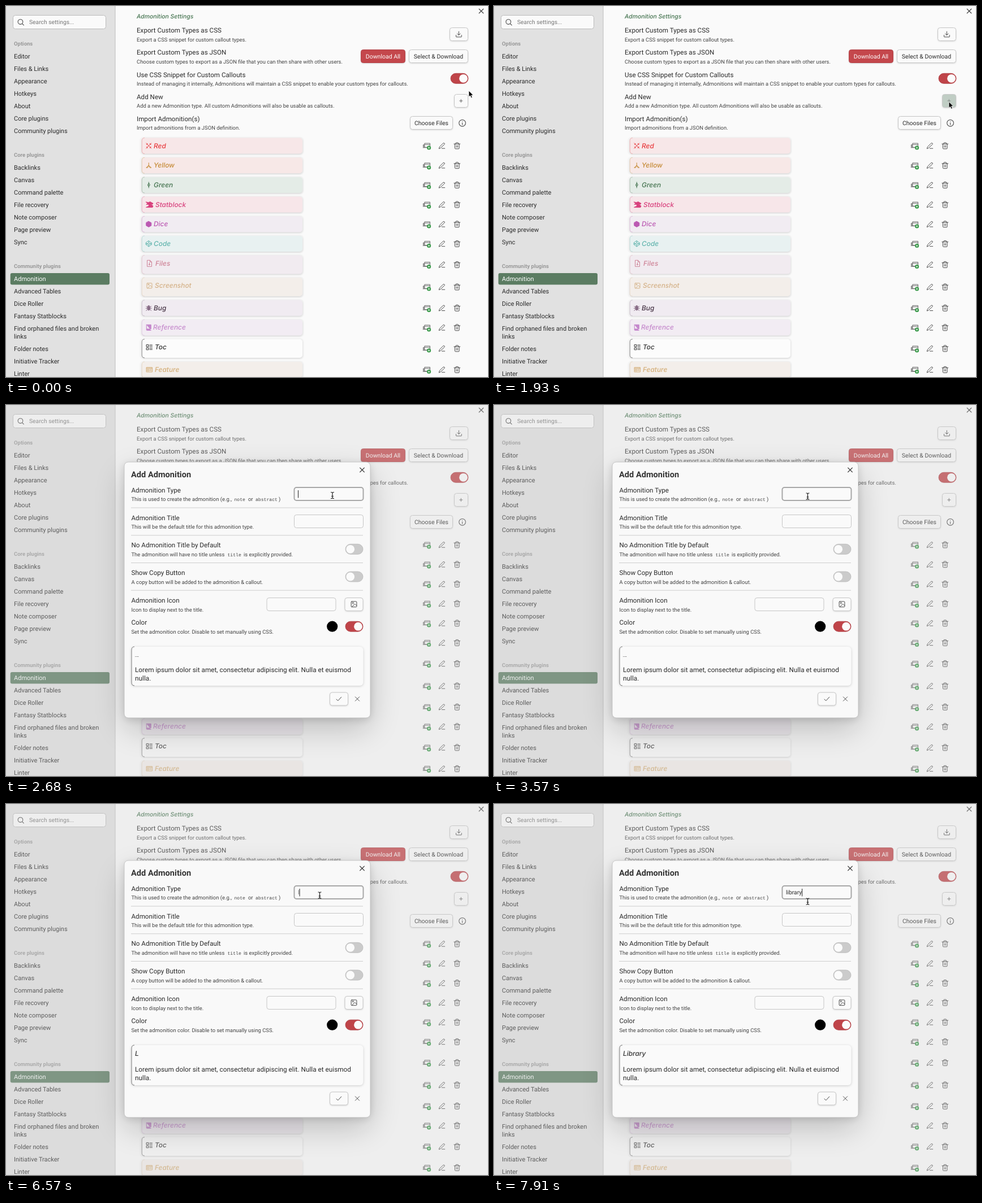
These frames come from a looping animation (852x657 px, 8000 ms). An HTML page:

```html
<!DOCTYPE html>
<html lang="en">
<head>
<meta charset="utf-8">
<title>Admonition settings</title>
<style>
html, body { margin: 0; width: 100%; height: 100%; overflow: hidden; background: #fafafa; }
svg { display: block; }
text { font-family: Roboto, "Open Sans", sans-serif; fill: #2b2b2b; white-space: pre; text-rendering: geometricPrecision; }
.nav { font-size: 11px; }
.group { font-size: 9.5px; font-weight: 600; fill: #999; }
.search { font-size: 10.3px; fill: #777; }
.name { font-size: 11.65px; }
.desc { font-size: 9.43px; fill: #444; }
.btn { font-size: 10.5px; text-anchor: middle; }
.code { font: 8.1px "Liberation Mono", monospace; fill: #444; }
.head { font-size: 14.6px; font-weight: 700; fill: #333; }
.lorem { font-size: 11.8px; }
.typed { font-size: 10.3px; }
.hand { font: italic 500 11.9px Inter, sans-serif; }
.light { fill: #fff; }
.line { fill: none; stroke: #444; stroke-linecap: round; stroke-linejoin: round; }
.box { fill: #fafafa; stroke: #c6c6c6; }
.raised { filter: drop-shadow(0 1px 1px rgba(0,0,0,.13)); }
.callout { filter: drop-shadow(0 1px 1.5px rgba(0,0,0,.14)); }
</style>
</head>
<body>
<svg id="stage" xmlns="http://www.w3.org/2000/svg" width="852" height="657" viewBox="0 0 852 657"></svg>
<script>
const rect = (x, y, w, h, r, attrs = '') =>
  `<rect x="${x}" y="${y}" width="${w}" height="${h}" rx="${r}" ${attrs}/>`;
const text = (cls, x, base, str, attrs = '') =>
  `<text class="${cls}" x="${x}" y="${base}" ${attrs}>${str.replace(/&/g, '&amp;')}</text>`;
// Icons are drawn on a 24-unit grid around their centre.
const icon = (cx, cy, size, d, attrs = '', width = 1.8) =>
  `<path class="line" transform="translate(${cx - size / 2} ${cy - size / 2}) scale(${size / 24})" stroke-width="${width}" d="${d}" ${attrs}/>`;
const tint = (color, fill = 'none') => `style="stroke:${color};fill:${fill}"`;
const button = (x, y, w, h, label = '', attrs = '') =>
  rect(x + .5, y + .5, w - 1, h - 1, 4, `class="box raised" ${attrs}`) +
  (label && text('btn', x + w / 2, y + h / 2 + 3.9, label));
const field = (x, y, w, h, attrs = '') => rect(x + .5, y + .5, w - 1, h - 1, 4, `class="box" ${attrs}`);
const toggle = (x, cy, on) =>
  rect(x, cy - 9, 31, 18, 9, on ? 'fill="#bf4449" stroke="#ab3d42" stroke-width=".8"' : 'fill="#cbcbcb" stroke="#b8b8b8" stroke-width=".8"') +
  `<circle cx="${x + (on ? 22.5 : 8.7)}" cy="${cy}" r="7.4" fill="#fbfbfb"/>`;
const setting = (x, y, name, desc) =>
  text('name', x, y + 4.2, name) + (desc ? text('desc', x, y + 19.6, desc) : '');

const CROSS = 'M5 5L19 19M19 5L5 19';
const PICTURE = 'M5 3H19Q21 3 21 5V19Q21 21 19 21H5Q3 21 3 19V5Q3 3 5 3ZM7 8a2 2 0 1 0 4 0a2 2 0 1 0-4 0M5 21L15 11L21 17';
const TRASH = 'M2 6H22M5 6V20Q5 22 7 22H17Q19 22 19 20V6M8 6V3Q8 2 9 2H15Q16 2 16 3V6M10 11V17M14 11V17';
const PENCIL = 'M12 21H22M17 3Q19 2 21 4Q22 6 20 8L7 20L2 22L4 16Z';
const DOWNLOAD = 'M3 15V20Q3 21 4 21H20Q21 21 21 20V15M7 10L12 15L17 10M12 15V3';
const CHECK = 'M4 13L9 18L20 6';

function sidebar() {
  const groups = [
    ['Options', 66.5, ['Editor', 'Files & Links', 'Appearance', 'Hotkeys', 'About', 'Core plugins', 'Community plugins']],
    ['Core plugins', 264, ['Backlinks', 'Canvas', 'Command palette', 'File recovery', 'Note composer', 'Page preview', 'Sync']],
    ['Community plugins', 461, ['Admonition', 'Advanced Tables', 'Dice Roller', 'Fantasy Statblocks',
      'Find orphaned files and broken', 'links', 'Folder notes', 'Initiative Tracker', 'Linter']],
  ];
  let out = rect(0, 0, 193, 657, 0, 'fill="#e1e1e1"') + rect(192.5, 0, 1, 657, 0, 'fill="#bdbdbd"') +
    rect(7.7, 473, 175.3, 20.4, 3, 'fill="#5b7c62"') +
    rect(12.5, 16.5, 164, 24, 4, 'id="search" fill="#fafafa" stroke="#bcbcbc"') +
    icon(26, 28.6, 13, 'M3 11a8 8 0 1 0 16 0a8 8 0 1 0-16 0M17 17L22 22', '', 2) +
    text('search', 41, 32.3, 'Search settings...') +
    rect(41, 22, 1, 13, 0, 'id="searchCaret" fill="#222"');
  for (const [title, y, items] of groups) {
    out += text('group', 14, y + 3.4, title);
    let cy = y + 22.3;
    for (const item of items) {
      if (item === 'links') cy -= 8;
      out += text(item === 'Admonition' ? 'nav light' : 'nav', 14, cy + 4, item);
      cy += 22;
    }
  }
  return out;
}

// name, centre, box height, text colour, fill, text x, icon path, solid icon
const callouts = [
  ['Red', 247.5, 28, '#e8393c', '#f7e7e8', 261, 'M3 3L21 21M21 3L3 21M4 8Q8 8 8 4M20 8Q16 8 16 4M4 16Q8 16 8 20M20 16Q16 16 16 20'],
  ['Yellow', 282.3, 28, '#c58a35', '#f7e8e7', 261, 'M12 3V12L3 20H8L12 12L16 20H21L12 12'],
  ['Green', 317, 28, '#44734f', '#e4ece7', 261, 'M12 2V22M12 6L8 12L12 18L16 12Z'],
  ['Statblock', 351.6, 28, '#d8417d', '#f7e6e9', 264, 'M0 3L9 5L14 2L25 8L23 11L16 11L25 17L23 22H0L11 17L8 11L1 12L5 8Z', true],
  ['Dice', 386.4, 28, '#bb58b2', '#f1ecf2', 261, 'M12 2L21 7V17L12 22L3 17V7Z', true],
  ['Code', 421, 28, '#62b5ae', '#e8f1f1', 261, 'M12 2L22 9V15L12 22L2 15V9ZM12 2V9M2 9L12 16L22 9M2 15L12 9L22 15M12 16V22'],
  ['Files', 458, 33, '#ce8296', '#f1ebf0', 264, 'M5 1H14L20 7V23H5ZM14 1V7H20M12 10V18M9 15L12 18L15 15'],
  ['Screenshot', 497.5, 33, '#d4b187', '#f3eeea', 263, PICTURE],
  ['Bug', 534.8, 28, '#463445', '#f0ebf1', 261, 'M8 8H16V17Q12 24 8 17ZM8 6Q12 0 16 6ZM2 13H22M3 6L8 10M21 6L16 10M3 21L8 17M21 21L16 17', true],
  ['Reference', 569.4, 28, '#c588cc', '#f2ecf3', 260, 'M4 2H20V17H6M4 2V20Q4 22 6 22H20M6 17Q4 17 4 20', true],
  ['Toc', 606.5, 33, '#333', '#fcfcfc', 263, 'M2 3H9V10H2ZM2 14H9V21H2ZM13 4H22M13 9H22M13 15H22M13 20H22'],
  ['Feature', 644, 28, '#d4ae78', '#f3eeea', 263, 'M2 4H22V20H2ZM2 7H22M5 11H10V16H5ZM13 11H19M13 15H19'],
];

function calloutRow([name, cy, h, color, fill, x, path, solid]) {
  const ty = h > 30 ? cy - 2.2 : cy;
  const tone = name === 'Bug' ? '#876b85' : color;
  const top = cy - h / 2;
  return rect(236, top - 2, 291, h + 5, 7, 'fill="#000" opacity=".02"') +
    rect(240, top, 284, h, 5, `fill="${fill}" class="callout"`) +
    `<path d="M245 ${top}Q240.3 ${top} 240.3 ${top + 5}V${top + h - 5}Q240.3 ${top + h} 245 ${top + h}" fill="none" stroke="${tone}" stroke-width=".6" opacity="${name === 'Toc' ? .9 : .5}"/>` +
    icon(x > 261 ? 253.5 : 252.3, ty, 12, path, tint(tone, solid ? tone : 'none'), 2) +
    text('hand', x, ty + 4, name, `style="fill:${color}"`) +
    icon(743.5, cy, 13, 'M6 4H23V17H6ZM6 8H23M3 8V18M0 10H3M0 14H3M0 18H14', tint('#666')) +
    `<circle cx="747.6" cy="${cy + 3.6}" r="3.5" fill="#2f9440"/>` +
    icon(747.6, cy + 3.6, 5, 'M12 4V20M4 12H20', tint('#fff'), 4) +
    icon(770.5, cy, 12.5, PENCIL) + icon(797.3, cy, 13, TRASH);
}

function page() {
  return rect(0, 0, 852, 657, 0, 'fill="#fafafa"') + sidebar() +
    text('hand', 231, 22, 'Admonition Settings', 'style="fill:#44734f;font-size:10.4px"') +
    setting(231, 43, 'Export Custom Types as CSS', 'Export a CSS snippet for custom callout types.') +
    setting(231, 82, 'Export Custom Types as JSON', 'Choose custom types to export as a JSON file that you can then share with other users.') +
    setting(231, 121.4, 'Use CSS Snippet for Custom Callouts',
      'Instead of managing it internally, Admonitions will maintain a CSS snippet to enable your custom types for callouts.') +
    setting(231, 160.6, 'Add New', 'Add a new Admonition type. All custom Admonitions will also be usable as callouts.') +
    setting(231, 199.6, 'Import Admonition(s)', 'Import admonitions from a JSON definition.') +
    button(784, 38, 33, 24) + icon(800.4, 50, 13, DOWNLOAD) +
    rect(627.5, 77.5, 78, 23, 4, 'fill="#c4474c" stroke="#b34348" class="raised"') + text('btn light', 666.5, 92.8, 'Download All') +
    button(712, 77, 105, 24, 'Select & Download') +
    toggle(786, 128.3, true) +
    button(792, 156, 25, 24, '', 'id="add"') + icon(804.3, 168, 8, 'M12 4V20M4 12H20', 'id="plus"', 2.4) +
    button(714, 195, 76, 24, 'Choose Files') +
    icon(806.6, 207.3, 14, 'M2 12a10 10 0 1 0 20 0a10 10 0 1 0-20 0M12 11V17M12 7V7.2') +
    icon(840, 9, 13, CROSS, '', 2.2) +
    callouts.map(calloutRow).join('');
}

function modal() {
  const divider = y => rect(221, y, 410, 1, 0, 'fill="#cdcdcd"');
  return rect(0, 0, 852, 657, 0, 'fill="#d2d2d2" opacity=".3"') +
    rect(209, 121, 435, 453, 20, 'filter="url(#wide)" opacity=".2"') +
    rect(209, 104, 435, 453, 8, 'filter="url(#near)" opacity=".13"') +
    rect(209, 101, 435, 453, 7, 'id="panel" fill="#f9f9f9" stroke="#bdbdbd" stroke-width=".8"') +
    '<g id="upper">' +
    text('head', 221, 127.5, 'Add Admonition') + icon(629.5, 115, 13, CROSS, '', 2.2) +
    setting(221.5, 150.5, 'Admonition Type') +
    text('desc', 221.5, 170, 'This is used to create the admonition (e.g.,') +
    text('code', 403.5, 170, 'note') + text('desc', 428, 170, 'or') +
    text('code', 441, 170, 'abstract') + text('desc', 482, 170, ')') +
    divider(181.5) + setting(221.5, 199.3, 'Admonition Title', 'This will be the default title for this admonition type.') +
    divider(230.3) + setting(221.5, 248, 'No Admonition Title by Default') +
    text('desc', 221.5, 267.6, 'The admonition will have no title unless') +
    text('code', 391.5, 267.6, 'title') + text('desc', 420, 267.6, 'is explicitly provided.') +
    divider(279) + setting(221.5, 297, 'Show Copy Button', 'A copy button will be added to the admonition & callout.') +
    divider(327.7) + setting(221.5, 346, 'Admonition Icon', 'Icon to display next to the title.') +
    setting(221.5, 385, 'Color', 'Set the admonition color. Disable to set manually using CSS.') +
    field(509, 145.5, 123, 24, 'id="typeField"') + field(509, 194, 123, 24) + field(460.5, 341, 123, 24) +
    button(598.5, 341, 33, 24) + icon(615, 352.8, 13, PICTURE) +
    toggle(600, 255.3, false) + toggle(600, 304, false) + toggle(600, 392.2, true) +
    '<circle cx="576.7" cy="392.2" r="9.6"/>' +
    text('typed', 516, 161, '', 'id="typed"') +
    rect(516, 151, 1, 13.5, 0, 'id="caret" fill="#222"') +
    '</g>' +
    rect(221.5, 428, 410, 69, 6, 'id="preview" fill="#fafafa" style="filter:drop-shadow(0 1px 2px rgba(0,0,0,.18))"') +
    '<path id="edge" fill="none" stroke="#444" stroke-width=".7"/>' +
    text('hand', 228, 446, '', 'id="title" style="fill:#333"') +
    '<g id="lower">' +
    text('lorem', 228, 473, 'Lorem ipsum dolor sit amet, consectetur adipiscing elit. Nulla et euismod') +
    text('lorem', 228, 488.3, 'nulla.') +
    button(572, 508.5, 33, 24) + icon(588.4, 520.5, 13, CHECK) + icon(621, 520.5, 12.5, CROSS) +
    '</g>';
}

document.getElementById('stage').innerHTML =
  `<defs>
    <filter id="wide" x="-50%" y="-50%" width="200%" height="200%"><feGaussianBlur stdDeviation="27"/></filter>
    <filter id="near" x="-20%" y="-20%" width="140%" height="140%"><feGaussianBlur stdDeviation="7"/></filter>
  </defs>` + page() + `<g id="modal">${modal()}</g>
  <path id="arrow" d="M0 0V11L2.6 8.7L4.3 12.8L6.3 12L4.6 8H8Z" stroke="#fff" stroke-width=".8"/>
  <path id="beam" class="line" style="stroke:#111" stroke-width="1.1" d="M-2.5-5.5Q0-5.5 0-4Q0-5.5 2.5-5.5M0-4V4M-2.5 5.5Q0 5.5 0 4Q0 5.5 2.5 5.5M-1.5 1.5H1.5"/>`;

const el = id => document.getElementById(id);
const at = (table, t) => table.reduce((found, step) => step[0] <= t ? step : found);

const LOOP = 8000;
const pointer = [
  [0, 818, 150], [150, 819, 143], [300, 818, 140], [450, 814, 147], [600, 807, 161], [740, 804, 169.5],
  [2230, 802, 169], [2380, 744, 166], [2530, 648, 162], [2680, 577, 160, 'beam'], [2830, 556, 160, 'beam'],
  [2970, 555, 161, 'beam'], [3120, 554.5, 161.5, 'beam'], [7910, 554.5, 172.5, 'beam'],
];
const searchFocus = [[0, 0, 0], [1040, 1, 1], [1490, 1, 0], [1790, 0, 0]];
const caretOn = [[0, 1], [3570, 0], [4020, 1], [4620, 0], [5070, 1], [5520, 0], [6120, 1]];
const addFill = [[0, '#fafafa'], [1790, '#dde4df'], [1930, '#c0cdc4'], [2080, '#fafafa']];
const typing = [[0, 0], [6570, 1], [6860, 2], [7010, 3], [7160, 4], [7310, 5], [7460, 6], [7610, 7]];

function draw(t) {
  const show = (id, on) => { el(id).style.display = on ? '' : 'none'; };
  const set = (id, attrs) => { for (const key in attrs) el(id).setAttribute(key, attrs[key]); };

  const [, x, y, kind = 'arrow'] = at(pointer, t);
  show('arrow', kind === 'arrow');
  show('beam', kind === 'beam');
  set(kind, { transform: `translate(${x} ${y})` });

  const [, focused, blink] = at(searchFocus, t);
  set('search', { stroke: focused ? '#a9a9a9' : '#bcbcbc', 'stroke-width': focused ? 2 : 1 });
  show('searchCaret', blink);
  el('add').style.fill = at(addFill, t)[1];
  el('plus').style.opacity = t >= 1790 && t < 2230 ? .55 : 1;

  show('modal', t >= 2080);
  const hover = t >= 2680;
  el('typeField').style.stroke = '#a8a8a8';
  el('typeField').style.strokeWidth = hover ? 2 : 1.2;

  const count = at(typing, t)[1];
  const typed = 'library'.slice(0, count);
  const grow = count ? 1 : 0;
  el('typed').textContent = typed;
  el('typed').style.opacity = count === 1 ? .6 : 1;
  el('title').textContent = count ? 'L' + typed.slice(1) : '...';
  el('title').style.fontSize = count ? '11.9px' : '8px';
  show('caret', at(caretOn, t)[1]);
  if (t >= 2080) set('caret', { x: 516 + (count ? el('typed').getComputedTextLength() : 0) });

  set('upper', { transform: `translate(0 ${-grow})` });
  set('lower', { transform: `translate(0 ${grow})` });
  set('panel', { y: 101 - grow, height: 453 + 2 * grow });
  const top = 428 - grow, bottom = 497 + grow;
  set('preview', { y: top, height: bottom - top });
  set('edge', { d: `M227 ${top}Q222 ${top} 222 ${top + 6}V${bottom - 6}Q222 ${bottom} 227 ${bottom}` });
}

const start = performance.now();
function tick() {
  draw((performance.now() - start) % LOOP);
  requestAnimationFrame(tick);
}
tick();
</script>
</body>
</html>
```
